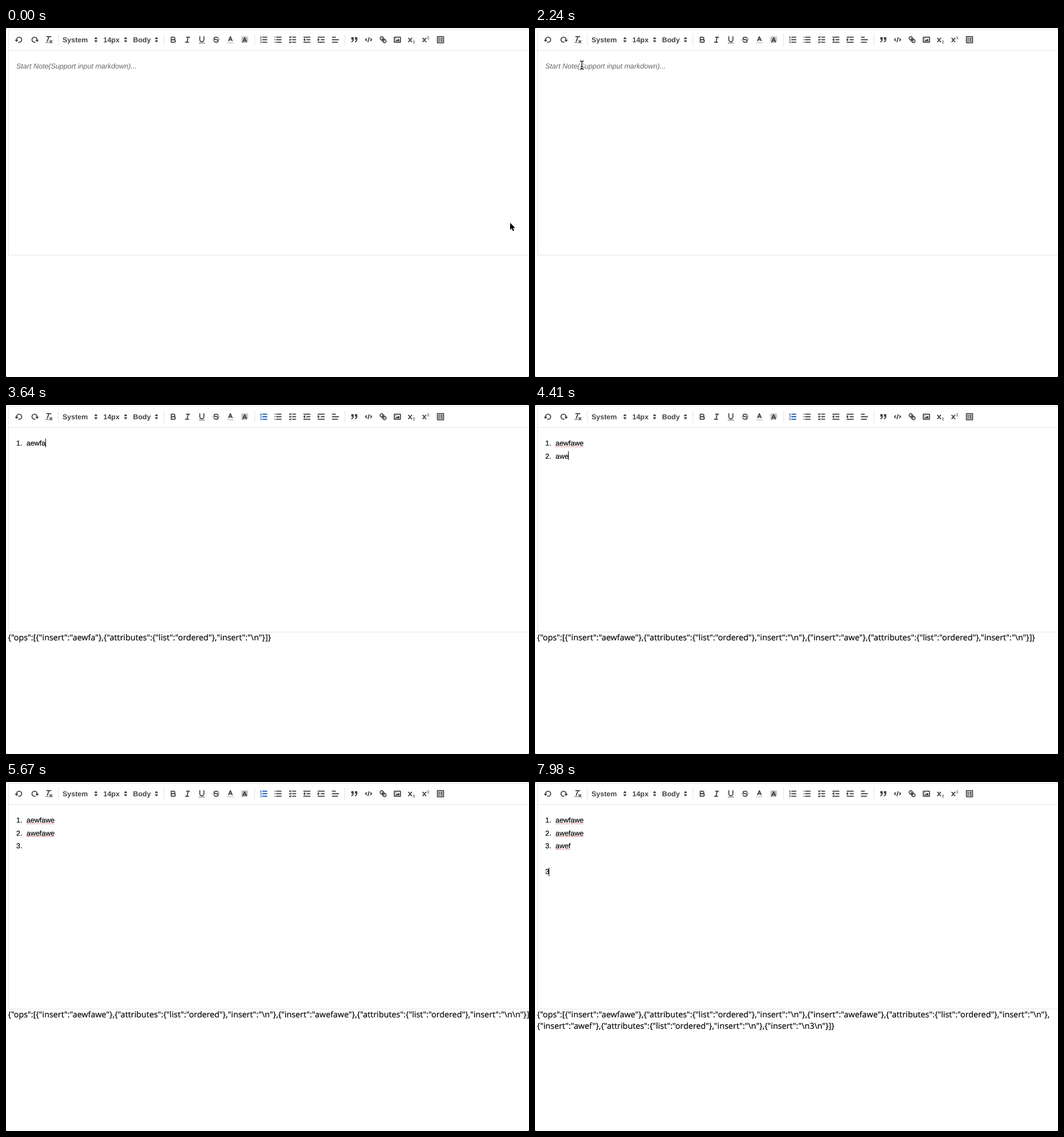
Recreate the animation shown at these times as an HTML page. Size 916 px wide and 611 px high, loop 8000 ms.

```html
<!DOCTYPE html>
<html lang="en">
<head>
<meta charset="utf-8">
<title>Note editor</title>
<style>
html, body { margin: 0; width: 100%; height: 100%; overflow: hidden; background: #999; }
#stage { position: absolute; left: 0; top: 0; width: 916px; height: 611px; overflow: hidden; background: #fff; border-radius: 3px; }
svg { position: absolute; left: 0; top: 0; }
text { font: 12.45px "Liberation Sans", Arial, sans-serif; white-space: pre; text-rendering: geometricPrecision; }
#doc text { stroke: #000; stroke-width: .2; }
.label { font-weight: bold; fill: #444; }
.hint { font-size: 12.53px; font-style: italic; fill: #666; }
.frame { fill: none; stroke: #e4e4e4; shape-rendering: crispEdges; }
.icon { color: #444; fill: none; stroke: currentColor; stroke-width: 2; stroke-linecap: round; stroke-linejoin: round; }
.icon.on { color: #1257b4; }
.icon .thin { stroke-width: 1; }
.icon .solid { fill: currentColor; stroke-width: 1.8; }
.icon .flat { fill: currentColor; stroke: none; }
.spell { stroke: #d0353a; stroke-width: 1.2; stroke-dasharray: 1.5 1.2; }
#caret { shape-rendering: crispEdges; }
#json { position: absolute; left: 3.5px; top: 398px; width: 940px; font: 14.33px/19.7px "Open Sans", "Noto Sans", sans-serif; color: #000; -webkit-text-stroke: .2px #000; text-rendering: geometricPrecision; }
</style>
</head>
<body>
<div id="stage">
  <div id="json"></div>
  <svg width="916" height="611">
    <path class="frame" d="M920 2.5H4.5V397.5H920M4 39.5H920M91.5 10V31M276.5 10V31M435.5 10V31M593.5 10V31"/>
    <g id="tools"></g>
    <text class="label" x="99" y="25">System</text>
    <text class="label" x="170.5" y="25">14px</text>
    <text class="label" x="222.5" y="25">Body</text>
    <text class="hint" id="hint" x="18" y="71">Start Note(Support input markdown)...</text>
    <g id="doc"></g>
    <rect id="caret" width="1" height="15"/>
    <g id="pointer">
      <path id="arrow" d="M0 0V12.4L2.8 9.8 4.9 14.6 7 13.7 5 9.1H8.8Z" stroke="#fff" stroke-width="1" paint-order="stroke"/>
      <g id="beam" fill="none" stroke-linecap="round">
        <path d="M-3-7.2Q0-7.2 0-5Q0-7.2 3-7.2M0-5V5M-3 7.2Q0 7.2 0 5Q0 7.2 3 7.2M-1.5 2.5H1.5" stroke="#fff" stroke-width="3"/>
        <path d="M-3-7.2Q0-7.2 0-5Q0-7.2 3-7.2M0-5V5M-3 7.2Q0 7.2 0 5Q0 7.2 3 7.2M-1.5 2.5H1.5" stroke="#000" stroke-width="1.2"/>
      </g>
    </g>
  </svg>
</div>
<script>
const LOOP = 8000, STEP = 70, BLINK = 490, CLICK = 1750;
const $ = id => document.getElementById(id);

function add(parent, tag, attrs, text) {
  const el = document.createElementNS('http://www.w3.org/2000/svg', tag);
  for (const k in attrs) el.setAttribute(k, attrs[k]);
  if (text !== undefined) el.textContent = text;
  parent.append(el);
  return el;
}

// Toolbar icons on an 18 unit grid: centre x and a path for each style.
const rows = x => `M${x} 4H15M${x} 9H15M${x} 14H15`;
const sorter = { solid: 'M7 11L9 13 11 11ZM7 7L9 5 11 7Z' };
const cross = 'M3 6L9 13M9 6L3 13';
const icons = {
  undo: [23, { line: 'M8.09 13.91A4.6 4.6 0 0 0 9 14 5 5 0 1 0 4 9', solid: 'M6 10L4 12 2 10Z' }],
  redo: [50, { line: 'M9.91 13.91A4.6 4.6 0 0 1 9 14 5 5 0 1 1 14 9', solid: 'M12 10L14 12 16 10Z' }],
  clean: [75, { line: 'M5 3H13M6 12L9.35 3M11 11L15 15M15 11L11 15', thin: 'M2.5 14.5H8.5' }],
  font: [157.5, sorter],
  size: [209.5, sorter],
  block: [263.5, sorter],
  bold: [293, { line: 'M5 4H9.5A2.5 2.5 0 0 1 9.5 9H5ZM5 9H10.5A2.5 2.5 0 0 1 10.5 14H5Z' }],
  italic: [318, { line: 'M7 4H13M5 14H11M8 14L10 4' }],
  underline: [343, { line: 'M5 3V9A4 4 0 0 0 13 9V3', thin: 'M3.5 15.5H14.5' }],
  strike: [368, { line: 'M12.9 6C12.4 4.8 10.8 4 9 4 6.8 4 5 5.1 5 6.5 5 7.6 5.8 8.4 9 9 12.2 9.6 13 10.3 13 11.5 13 12.9 11.2 14 9 14 7.2 14 5.6 13.2 5.1 12', thin: 'M2.5 9.5L15.5 8.5' }],
  color: [393, { line: 'M5.5 11L9 3 12.5 11M6.4 9H11.6', thin: 'M3 15H15' }],
  fill: [418, { line: 'M5.5 13L9 5 12.5 13M6.4 11H11.6', thin: 'M3 5L5 3M3 8L8 3M3 11L11 3M3 14L14 3M5 15L15 5M8 15L15 8M11 15L15 11' }],
  ordered: [451.5, { line: rows(7), thin: 'M2.5 3L3.5 2.5V5.5M2.5 5.5H4.5M4.5 10.5H2.5C2.5 10.3 4.35 9.4 4.35 8.3A.96 .96 0 0 0 2.5 8.15M2.5 14.85A.96 .96 0 0 0 4.35 14.74 .7 .7 0 0 0 3.75 14 .7 .7 0 0 0 4.35 13.26 .96 .96 0 0 0 2.5 13.15' }],
  bullet: [476.5, { line: rows(6) + 'M3 4H3.01M3 9H3.01M3 14H3.01' }],
  check: [502, { line: rows(9) + 'M3 4L4 5 6 3M3 9L4 10 6 8M3 14L4 15 6 13' }],
  outdent: [527, { line: 'M3 4H15M9 9H15M3 14H15', solid: 'M5 7V11L3 9Z' }],
  indent: [552, { line: 'M3 4H15M9 9H15M3 14H15', solid: 'M3 7V11L5 9Z' }],
  align: [577, { line: 'M3 4H9M3 9H15M3 14H13' }],
  quote: [610, { line: 'M7 8C7 12 4 13 4 13M14 8C14 12 11 13 11 13', solid: 'M4 5H7V8H4ZM11 5H14V8H11Z' }],
  code: [635, { line: 'M5 7L3 9 5 11M13 7L15 9 13 11M10 5L8 13' }],
  link: [660.5, { line: 'M7 7L11 11M8.9 4.58A3.48 3.48 0 0 1 9.26 9.26 3.48 3.48 0 0 1 4.58 8.9C3.19 7.5 2.04 6.4 4.22 4.22S7.5 3.19 8.9 4.58ZM13.42 9.1A3.48 3.48 0 0 0 8.74 8.74 3.48 3.48 0 0 0 9.1 13.42C10.5 14.81 11.6 15.96 13.78 13.78S14.81 10.5 13.42 9.1Z' }],
  image: [685.5, { line: 'M3 4H15V14H3Z', flat: 'M5 12V11L7 9 8 10 11 7 13 9V12ZM5 7A1 1 0 0 0 7 7 1 1 0 0 0 5 7Z' }],
  sub: [710.5, { line: cross, thin: 'M12.2 12.2A1.2 1.2 0 0 1 14.7 12.3C14.7 13.3 12.2 14.2 12.2 15.4H15' }],
  sup: [735.5, { line: cross, thin: 'M12.2 4.2A1.2 1.2 0 0 1 14.7 4.3C14.7 5.3 12.2 6.2 12.2 7.4H15' }],
  table: [761, { line: 'M3 3H15V15H3Z', flat: 'M5 5H8V7H5ZM9 5H13V7H9ZM5 8H8V10H5ZM9 8H13V10H9ZM5 11H8V13H5ZM9 11H13V13H9Z' }]
};
const tools = {};
for (const name in icons) {
  const [cx, parts] = icons[name];
  const g = add($('tools'), 'g', { class: 'icon', transform: `translate(${cx - 8.06} 12.44) scale(.895)` });
  for (const style in parts) add(g, 'path', { class: style, d: parts[style] });
  tools[name] = g;
}
tools.color.querySelector('.thin').setAttribute('opacity', .5);

// Key presses as [time, key].
const type = (start, gap, text) => [...text].map((key, i) => [start + i * gap, key]);
const keys = [
  [2730, '1'], [2940, '.'], [3150, ' '], [3290, 'a'],
  ...type(3430, 70, 'ewfawe'), [4060, '\n'],
  ...type(4270, 70, 'awefaw'), [4760, 'e'], [5180, '\n'],
  [6160, 'a'], [6300, 'w'], [6370, 'e'], [6370, 'f'],
  [6720, '\n'], [6930, '\n'], [7280, '\n'], [7910, '3']
];

function toJson(lines) {
  const ops = [];
  const push = (insert, list) => {
    const last = ops[ops.length - 1];
    if (last && !last.attributes === !list) last.insert += insert;
    else ops.push(list ? { attributes: { list: 'ordered' }, insert } : { insert });
  };
  for (const { text, list } of lines) {
    if (text) push(text, false);
    push('\n', list);
  }
  return JSON.stringify({ ops });
}

function replay(count) {
  const lines = [{ text: '', list: false }];
  let json = '';
  for (const [, key] of keys.slice(0, count)) {
    const last = lines[lines.length - 1];
    if (key === ' ') {
      last.text = '';
      last.list = true;
      continue; // the readout follows with the next key
    }
    if (key !== '\n') last.text += key;
    else if (last.list && !last.text) last.list = false;
    else lines.push({ text: '', list: last.list });
    json = toJson(lines);
  }
  return { lines, json };
}

function showDoc(count) {
  const { lines, json } = replay(count), doc = $('doc');
  doc.replaceChildren();
  lines.forEach(({ text, list }, i) => {
    const x = list ? 36 : 18, y = 71 + 22.5 * i, last = i === lines.length - 1;
    if (list) add(doc, 'text', { x: 18, y }, `${i + 1}.`);
    const end = x + add(doc, 'text', { x, y }, text).getComputedTextLength();
    if (list && text && !last) add(doc, 'path', { class: 'spell', d: `M${x} ${y + 2}H${end}` });
    if (last) {
      $('caret').setAttribute('x', Math.floor(end));
      $('caret').setAttribute('y', Math.floor(59 + 22.75 * i));
    }
  });
  $('json').textContent = json;
  $('hint').style.display = count ? 'none' : '';
  tools.ordered.classList.toggle('on', lines[lines.length - 1].list);
}

// Pointer stops as [time, x, y].
const path = [
  [0, 883, 341], [70, 906, 330], [350, 503, 77], [490, 503, 77],
  [770, 96, 100], [1050, 547, 22], [1190, 547, 22], [1680, 82, 65], [LOOP, 82, 65]
];

function pointerAt(t) {
  const i = path.findIndex(p => p[0] > t);
  const [t0, x0, y0] = path[i - 1], [t1, x1, y1] = path[i];
  const u = (t - t0) / (t1 - t0), k = u * u * (3 - 2 * u);
  return [x0 + (x1 - x0) * k, y0 + (y1 - y0) * k];
}

let shown = -1;
function draw() {
  const t = performance.now() % LOOP;
  const count = keys.filter(k => k[0] <= t).length;
  if (count !== shown) showDoc(shown = count);

  const since = t - (count ? keys[count - 1][0] : CLICK);
  $('caret').style.display = since >= 0 && Math.floor(since / BLINK) % 2 === 0 ? '' : 'none';

  const tick = Math.floor(t / STEP) * STEP, [x, y] = pointerAt(tick);
  const onBar = y < 39, arrow = tick === 0 || onBar;
  $('pointer').style.display = count ? 'none' : '';
  $('pointer').setAttribute('transform', `translate(${Math.round(x)} ${Math.round(y)})`);
  $('arrow').style.display = arrow ? '' : 'none';
  $('beam').style.display = arrow ? 'none' : '';
  tools.indent.classList.toggle('on', onBar && Math.abs(x - 552) < 12);
  requestAnimationFrame(draw);
}
draw();
</script>
</body>
</html>
```
